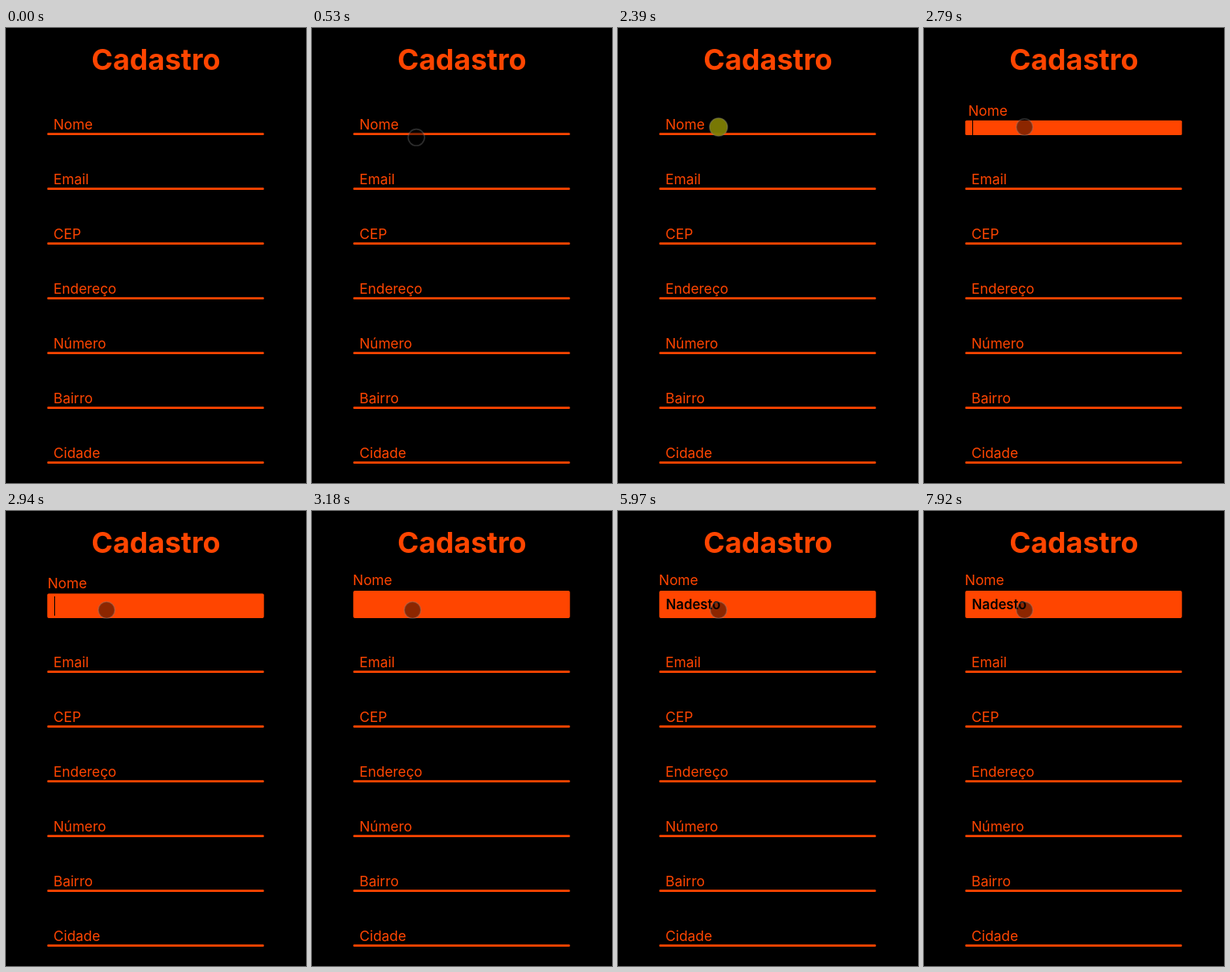
These frames come from a looping animation (373 by 565 pixels, 8 s). An HTML page:

```html
<!DOCTYPE html>
<html lang="pt-BR">
<head>
<meta charset="utf-8">
<title>Cadastro</title>
<style>
  html, body { margin: 0; width: 100%; height: 100%; overflow: hidden; background: #000; }
  svg { display: block; width: 373px; height: 565px; font: 17.4px Inter, "Open Sans", sans-serif; fill: #ff4500; }
  #title { font-size: 36px; font-weight: 700; text-anchor: middle; }
  #typed { font-size: 16.8px; font-weight: 600; fill: #000; white-space: pre; }
  #caret { fill: #000; }
  #pointer { stroke: rgba(128, 128, 128, .35); stroke-width: 1.6px; }
</style>
</head>
<body>
<svg id="stage" viewBox="0 0 373 565">
  <text id="title" x="186.5" y="51.5">Cadastro</text>
  <g id="fields"></g>
  <text id="typed" x="59.6" y="122"></text>
  <rect id="caret" width="1" height="24"/>
  <circle id="pointer"/>
</svg>
<script>
const LOOP = 8000, TICK = 77.67, BOTTOM = 132.9;
const LABELS = ["Nome", "Email", "CEP", "Endereço", "Número", "Bairro", "Cidade"];
const VALUE = "Nadesto ";
const KEYS = [3640, 3950, 4180, 4330, 4500, 4650, 4800, 5450];
// the caret toggles at each of these times, starting hidden
const BLINKS = [2710, 3180, 3640, 5360, 5450, 5970, 6450, 6980, 7460, 7920];

const $ = id => document.getElementById(id);
const set = (el, attrs) => { for (const k in attrs) el.setAttribute(k, attrs[k]); };
const mix = (a, b, p) => a + (b - a) * p;
const span = (t, from, to) => Math.min(1, Math.max(0, (t - from) / (to - from)));
const countPast = (times, t) => times.filter(x => t >= x).length;

function add(tag, attrs) {
  const el = document.createElementNS("http://www.w3.org/2000/svg", tag);
  set(el, attrs);
  return $("fields").appendChild(el);
}

const rows = LABELS.map((name, i) => {
  const y = i * 68;
  const box = add("rect", { x: 51.3, y: 130.2 + y, width: 269.4, height: 2.7, rx: 1 });
  const label = add("text", { x: 59, y: 126 + y });
  label.textContent = name;
  return { box, label };
});

// the CSS "ease" curve, cubic-bezier(.25, .1, .25, 1)
function ease(x) {
  const bez = (a, b, s) => 3 * a * s * (1 - s) ** 2 + 3 * b * s * s * (1 - s) + s ** 3;
  let lo = 0, hi = 1;
  for (let i = 0; i < 20; i++) {
    const mid = (lo + hi) / 2;
    if (bez(.25, .25, mid) < x) lo = mid; else hi = mid;
  }
  return bez(.1, 1, lo);
}

function drawField(t, step) {
  const p = t < 2710 ? 0 : ease(span(step, 2650, 3150));
  const top = mix(130.2, 99, p);
  set(rows[0].box, { y: top, height: BOTTOM - top, rx: mix(1, 2, p) });
  set(rows[0].label, { x: mix(59, 50.8, p), y: mix(126, 92, p) });

  const typed = $("typed");
  typed.textContent = VALUE.slice(0, countPast(KEYS, t));
  const width = typed.textContent ? typed.getComputedTextLength() : 0;
  set($("caret"), {
    x: Math.round(59.6 + width),
    y: Math.round((top + BOTTOM) / 2 - 12),
    visibility: countPast(BLINKS, t) % 2 ? "visible" : "hidden"
  });
}

function drawPointer(t, step) {
  const rest = 1 - span(step, 150, 690);
  const settle = span(step, 765, 1070);
  const pressed = t >= 2390 && t < 2560;
  set($("pointer"), {
    cx: 126 + 97 * rest ** 2.5 - settle,
    cy: 127 + 106 * rest ** 1.9 - 4 * settle,
    r: pressed ? 11.2 : 10.2,
    fill: pressed ? "rgba(128,128,4,.94)" : "rgba(0,0,0,.45)",
    visibility: t < 150 ? "hidden" : "visible"
  });
}

function frame(now) {
  const t = now % LOOP;
  const step = Math.floor((t + 20) / TICK) * TICK; // motion runs at about 13 steps a second
  drawField(t, step);
  drawPointer(t, step);
  requestAnimationFrame(frame);
}
requestAnimationFrame(frame);
</script>
</body>
</html>
```
